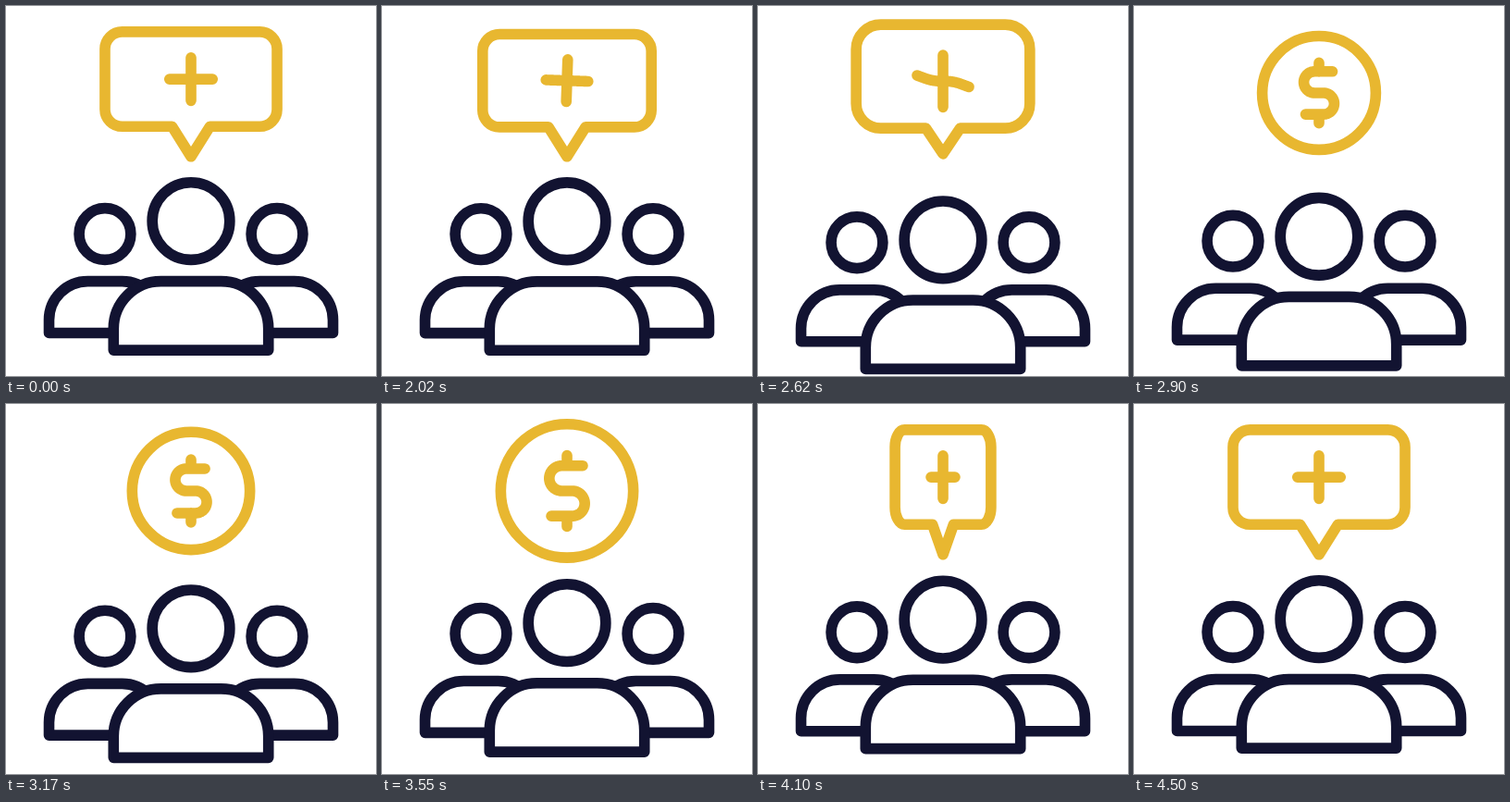
An HTML page that plays this animation: 400x400 px, repeating every 4.52 s.

```html
<!DOCTYPE html>
<html lang="en">
<head>
<meta charset="utf-8">
<title>Group icon</title>
<style>
  html, body { margin: 0; width: 100%; height: 100%; overflow: hidden; background: #fff; }
  svg { display: block; width: 100vw; height: 100vh; }
  path, circle { fill: #fff; stroke: #121331; stroke-width: 12.5; stroke-linecap: round; stroke-linejoin: round; }
  #speech path { fill: none; stroke: #e8b730; }
</style>
</head>
<body>
<svg viewBox="0 0 430 430">
  <defs>
    <g id="side">
      <circle cx="115" cy="265" r="30"/>
      <path d="M180 380H50V365a45 45 0 0 1 45-45h40a45 45 0 0 1 45 45Z"/>
    </g>
  </defs>
  <g id="sides">
    <use href="#side"/>
    <use href="#side" transform="translate(430) scale(-1 1)"/>
  </g>
  <g id="leader">
    <circle cx="215" cy="250" r="45"/>
    <path d="M125 400V375a55 55 0 0 1 55-55h70a55 55 0 0 1 55 55v25Z"/>
  </g>
  <g id="speech" transform="translate(215)"><path id="outline"/><path id="sign"/></g>
</svg>
<script>
const LOOP = 4520, START = 1990, POP = 2530, FLIP = 3970;
const TIP = 175, COIN_Y = 101;
const $ = id => document.getElementById(id);
const mix = (a, b, m) => a + (b - a) * m;
const part = (t, from, to) => Math.min(1, Math.max(0, (t - from) / (to - from)));
const ease = u => u * u * (3 - 2 * u);
const smooth = (t, from, to) => ease(part(t, from, to));

// Cubic easing with flat ends; x1 and x2 are the handle positions in time
function bezierEase(u, x1, x2) {
  let lo = 0, hi = 1, s;
  for (let i = 0; i < 20; i++) {
    s = (lo + hi) / 2;
    const x = 3 * x1 * s * (1 - s) ** 2 + 3 * x2 * s * s * (1 - s) + s ** 3;
    if (x < u) lo = s; else hi = s;
  }
  return ease(s);
}

// Rounded box with a tail that becomes a circle as m goes to 1
function outlinePath({ scale, radius, m, quick, sx }) {
  const fromTip = y => TIP - y * scale, base = COIN_Y + radius;
  const w = mix(100 * scale, radius, m) * sx;
  const top = mix(fromTip(145), COIN_Y - radius, m);
  const bottom = mix(fromTip(35), base, m);
  const r = mix(20 * scale, radius, m), rx = r * sx;
  const tail = 22 * scale * (1 - m) * sx;
  const corner = (x, y) => `A${rx} ${r} 0 0 0 ${x} ${y}`;
  return `M0 ${mix(TIP, base, quick)}L${tail} ${bottom}H${w - rx}${corner(w, bottom - r)}` +
    `V${top + r}${corner(w - rx, top)}H${rx - w}${corner(-w, top + r)}` +
    `V${bottom - r}${corner(rx - w, bottom)}H${-tail}Z`;
}

// Plus whose bar curls into an S while its stem splits into two stubs
function signPath({ scale, radius, m, quick, curl, angle, sx }) {
  const size = radius / 77, c = Math.cos(angle), s = Math.sin(angle);
  const cy = mix(TIP - 90 * scale, COIN_Y, quick);
  const at = (x, y) => `${(x * c - y * s) * sx} ${cy + x * s + y * c}`;

  const steps = 60, step = mix(25 * scale, 76 * size, curl) / steps;
  const bar = [at(0, 0)];
  for (let i = 0, x = 0, y = 0; i < steps; i++) {
    const heading = Math.PI * curl * part((i + 0.5) / steps, 0.08, 0.68);
    x += step * Math.cos(heading);
    y += step * Math.sin(heading);
    bar.push(at(x, y));
    bar.unshift(at(-x, -y));
  }
  const inner = 29 * size * m, outer = mix(25 * scale, 41 * size, quick);
  return "M" + bar.join("L") +
    [-1, 1].map(d => `M${at(0, outer * d)}L${at(0, inner * d)}`).join("");
}

function pose(t) {
  if (t >= FLIP)
    return { scale: 1, radius: 72, m: 0, quick: 0, curl: 0, angle: 0, sx: 1 - (1 - part(t, FLIP, LOOP)) ** 3 };
  return {
    scale: 1 - 0.46 * smooth(t, START, 2240) + 0.535 * smooth(t, 2240, POP),
    radius: 66 + 13.3 * smooth(t, 3100, 3360) - 7.3 * smooth(t, 3360, FLIP),
    m: smooth(t, POP, 2890),
    quick: smooth(t, POP, 2740),
    curl: smooth(t, POP + 20, 2890),
    angle: Math.PI * (smooth(t, START, POP - 40) % 1),
    sx: 1 - part(t, 3450, FLIP) ** 3
  };
}

function draw(now) {
  const t = now % LOOP, p = pose(t);
  const dip = smooth(t, START, POP) - bezierEase(part(t, POP, 4500), 0.3, 0.235);
  $("leader").setAttribute("transform", `translate(0 ${22 * dip})`);
  $("sides").setAttribute("transform", `translate(0 ${10 * dip})`);
  $("outline").setAttribute("d", outlinePath(p));
  $("sign").setAttribute("d", signPath(p));
  requestAnimationFrame(() => draw(performance.now()));
}
draw(0);
</script>
</body>
</html>
```
